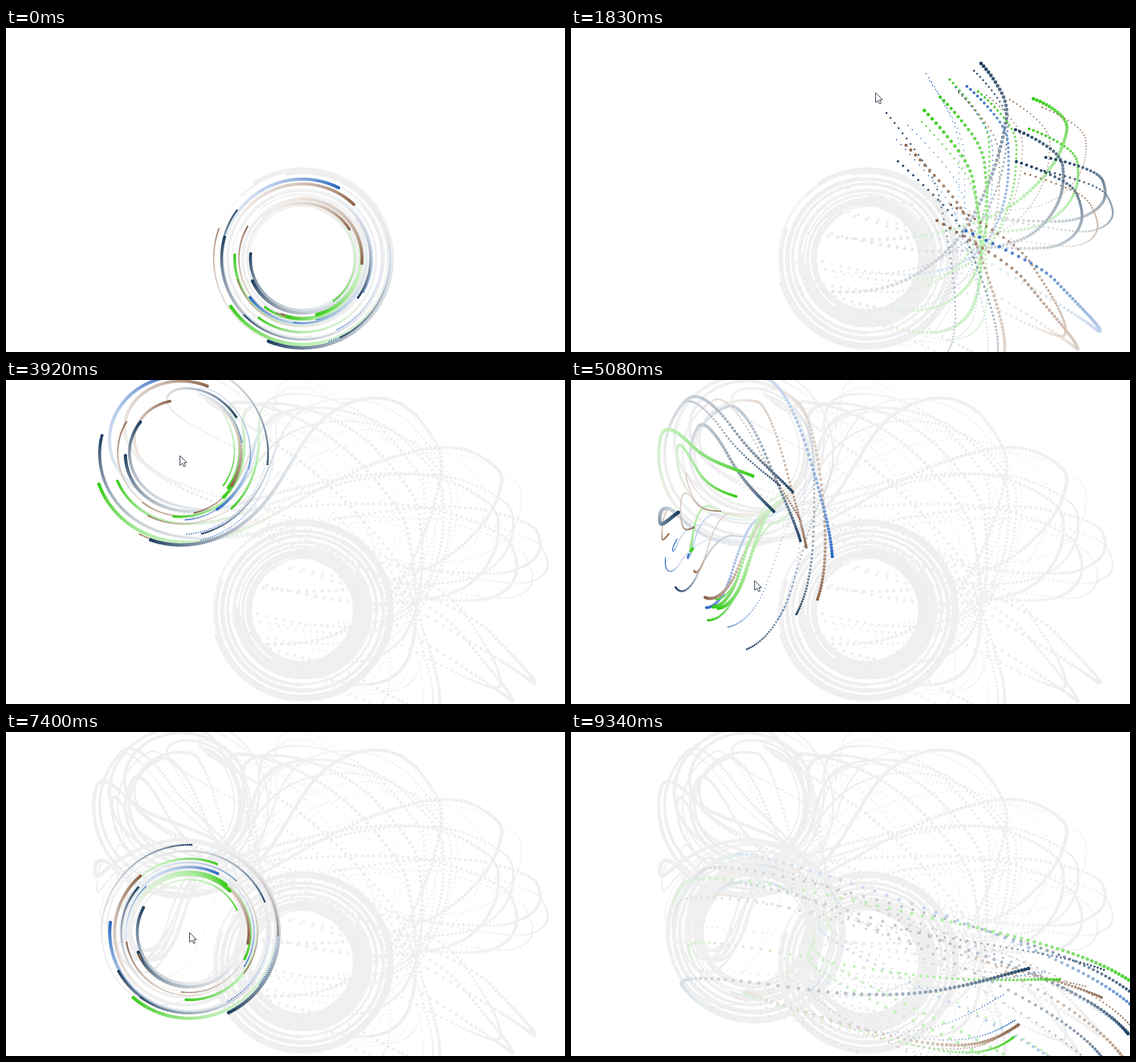
Write an HTML page with a canvas that moves like this. It is 924 px wide and 537 px high and loops after 9.42 s.

```html
<!DOCTYPE html>
<html lang="en">
<head>
<meta charset="utf-8">
<title>Orbiting trails</title>
<style>
html, body { margin: 0; width: 100%; height: 100%; overflow: hidden; background: #fff; }
canvas { display: block; }
</style>
</head>
<body>
<canvas id="stage" width="924" height="537"></canvas>
<script>
const LOOP = 9420, TICK = 77.2, STEPS_PER_MS = 0.06;
const FIRST_STEP = -155, LAST_STEP = 570, FADE_STEPS = 110;
const FADE = 0.97, FOLLOW = 0.05;
const ENTER = 580, LEAVE = 8620;

const stage = document.getElementById('stage');
const ctx = stage.getContext('2d');
const residue = document.createElement('canvas');
residue.width = stage.width;
residue.height = stage.height;
const residueCtx = residue.getContext('2d');

// Each particle: orbit radius, start angle (deg), speed (deg/s), dot diameter.
const groups = [
  { rgb: [141, 100, 73], particles: [
    [123.5, -46.6, 85.9, 5.2], [91.5, -32, 74.1, 4.5], [98.5, 4.6, 98.1, 5.2],
    [99.7, 115, 94.9, 2.4], [113, 161.7, 80.4, 2.6], [105, 210.2, 91.96, 3.2],
    [146.7, 199.5, 70.6, 2.7], [98, 110.5, 82.8, 3]] },
  { rgb: [43, 105, 191], particles: [
    [131.5, -63, 82.45, 5.5], [115.5, 29, 86.9, 2.3], [131, 64, 96.9, 2.2],
    [107, 97.6, 88.4, 2.6], [108, 143.3, 69.26, 4.8], [104.3, 77.3, 68.8, 2.1],
    [144.5, 72.2, 92.5, 2.2]] },
  { rgb: [54, 204, 23], particles: [
    [87, 54, 86.64, 2.8], [96, 75.5, 80.9, 5.8], [142.5, 146, 95.2, 5.8],
    [122, 126.3, 71.05, 4], [99.5, 104.6, 76.06, 5.4], [101.5, 127.3, 83.6, 4.2],
    [112, 183, 85.1, 4.7]] },
  { rgb: [30, 63, 96], particles: [
    [112.5, 35.2, 73.8, 4], [145, 64.3, 76.64, 3.4], [148.2, 112.2, 90.76, 6],
    [134.5, 135.6, 75.97, 3.4], [90.5, 155.7, 97.7, 5.4], [86, 185.4, 100.4, 5],
    [133.5, 195.3, 91.3, 5], [134.5, 216.2, 85.2, 3.6]] }
];

// Pointer positions: time in ms, x, y.
const pointerKeys = [
  [0, 490, 382], [579, 490, 382], [ENTER, 831, 530], [1080, 812, 417],
  [1200, 800, 355], [1400, 762, 270], [1600, 705, 165], [1710, 579, 135],
  [1830, 510, 107], [2050, 395, 112], [2250, 320, 119], [2400, 290, 125],
  [2760, 283, 127], [3000, 287, 125], [4250, 287, 125], [4650, 303, 332],
  [8280, 303, 332], [LEAVE, 870, 533], [LOOP, 870, 533]
];

function pointerAt(time) {
  const next = Math.max(1, pointerKeys.findIndex(key => key[0] > time));
  const [t0, x0, y0] = pointerKeys[next - 1];
  const [t1, x1, y1] = pointerKeys[next];
  const p = Math.max(0, (time - t0) / (t1 - t0));
  return [x0 + (x1 - x0) * p, y0 + (y1 - y0) * p];
}

// The shared orbit centre eases towards the pointer at every step.
const centres = new Map();
let cx = 490, cy = 382;
for (let step = FIRST_STEP; step <= LAST_STEP; step++) {
  const [px, py] = pointerAt(Math.min(LOOP - 1, step / STEPS_PER_MS));
  cx += (px - cx) * FOLLOW;
  cy += (py - cy) * FOLLOW;
  centres.set(step, [cx, cy]);
}

// Fading rounds to whole levels, so a pale grey never disappears.
for (const group of groups) {
  let darkness = group.rgb.map(c => 255 - c);
  group.shades = [];
  for (let age = 0; age <= FADE_STEPS; age++) {
    group.shades.push(`rgb(${darkness.map(d => 255 - d).join()})`);
    darkness = darkness.map(d => Math.round(d * FADE));
  }
}

function drawStep(target, step, age) {
  const [x0, y0] = centres.get(step);
  for (const { shades, particles } of groups) {
    target.fillStyle = shades[age];
    target.beginPath();
    for (const [radius, start, speed, size] of particles) {
      const angle = (start + speed * step / 60) * Math.PI / 180;
      const x = x0 + radius * Math.cos(angle);
      const y = y0 + radius * Math.sin(angle);
      target.moveTo(x + size / 2, y);
      target.arc(x, y, size / 2, 0, Math.PI * 2);
    }
    target.fill();
  }
}

let settled = FIRST_STEP;
function settleUpTo(step) {
  if (step < settled) {
    residueCtx.clearRect(0, 0, residue.width, residue.height);
    settled = FIRST_STEP;
  }
  for (; settled < step; settled++) drawStep(residueCtx, settled, FADE_STEPS);
}

const arrow = new Path2D('M0 0V16L4 12.5L6.6 18.2L9.2 17L6.7 11.6H11.5Z');
function drawPointer(time) {
  if (time < ENTER || time > LEAVE) return;
  const [x, y] = pointerAt(time);
  ctx.save();
  ctx.translate(Math.round(x) + 0.5, Math.round(y) + 0.5);
  ctx.fillStyle = '#fff';
  ctx.strokeStyle = '#14202e';
  ctx.lineWidth = 1;
  ctx.fill(arrow);
  ctx.stroke(arrow);
  ctx.restore();
}

function draw(time) {
  const step = Math.round(time * STEPS_PER_MS);
  const oldest = Math.max(FIRST_STEP, step - FADE_STEPS + 1);
  settleUpTo(oldest);
  ctx.fillStyle = '#fff';
  ctx.fillRect(0, 0, stage.width, stage.height);
  ctx.drawImage(residue, 0, 0);
  for (let s = oldest; s <= step; s++) drawStep(ctx, s, step - s);
  drawPointer(time);
}

const began = performance.now();
let shown = -1;
function frame() {
  const time = (performance.now() - began) % LOOP;
  const tick = Math.min(121, Math.floor((time + 22) / TICK));
  if (tick !== shown) {
    shown = tick;
    draw(Math.max(0, tick * TICK - 10));
  }
  requestAnimationFrame(frame);
}
frame();
</script>
</body>
</html>
```
